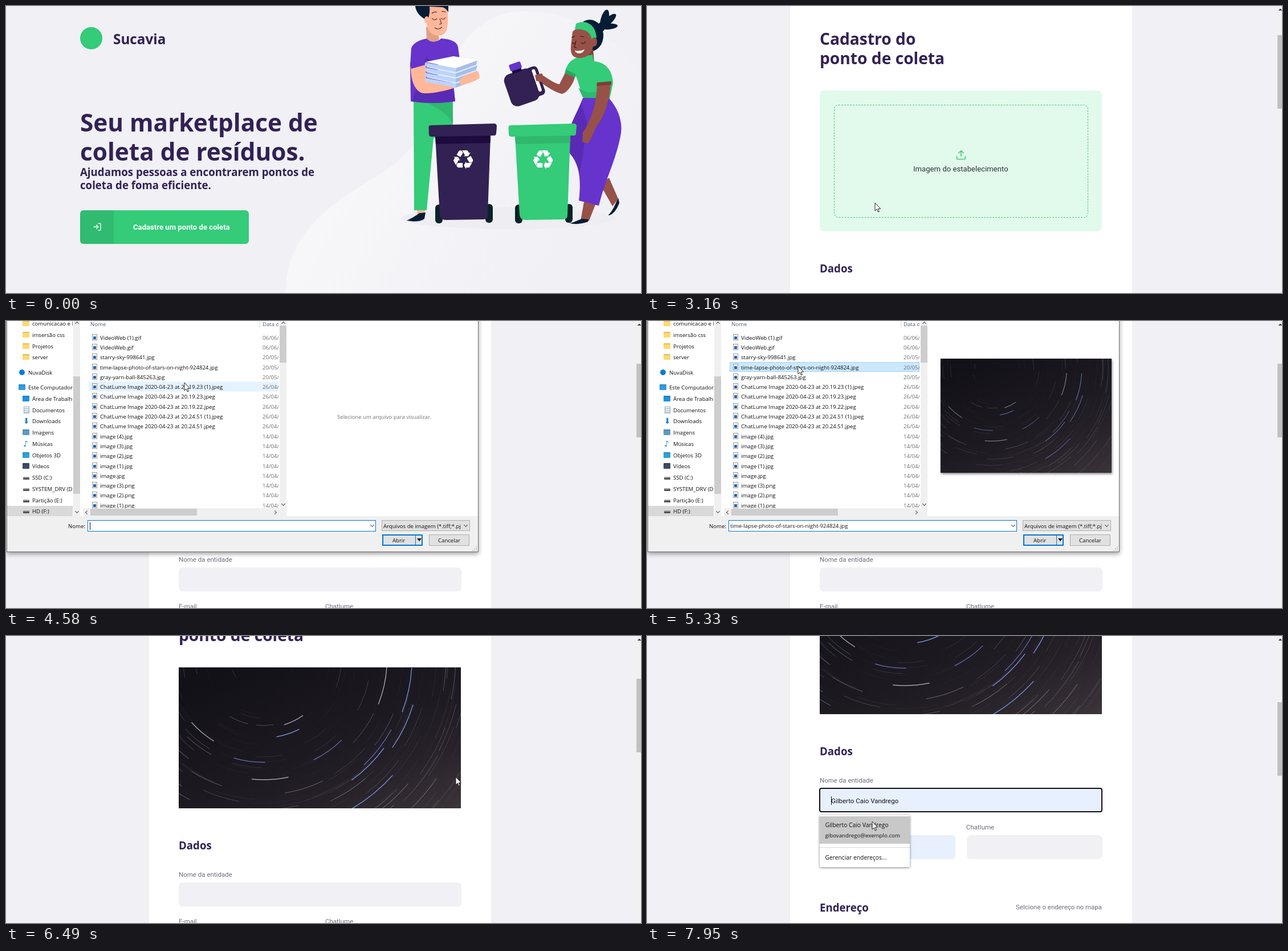
Animation of 1114 by 503 pixels, one loop 8000 ms. Source, as an HTML page:

```html
<!DOCTYPE html>
<html lang="pt-BR">
<head>
<meta charset="utf-8">
<title>Ponto de coleta</title>
<style>
html, body { margin: 0; width: 100%; height: 100%; overflow: hidden; background: #f0f0f5; }
#stage { position: relative; width: 1114px; height: 503px; overflow: hidden; background: #f0f0f5; color: #322153; }
#stage div, #stage svg { position: absolute; box-sizing: border-box; }
.full { left: 0; top: 0; width: 1114px; height: 503px; }
svg { overflow: visible; }

/* text centred on its --y */
.t { position: absolute; left: calc(var(--x) * 1px); top: calc(var(--y) * 1px); transform: translateY(-50%); white-space: pre; font: 11.5px Roboto, sans-serif; }
.head { font: 700 18.66px "Open Sans", sans-serif; }
.big { font-size: 42.3px; }
.mid { font-size: 28.2px; }
.brand { font: 700 24.3px "Open Sans", sans-serif; }
.label { color: #6c6c80; }
.body { font-size: 13.15px; }
.ui { font: 9.6px "Open Sans", sans-serif; color: #111; }
.mark { width: 39px; height: 39px; border-radius: 50%; background: #34cb79; }

/* home */
#button { left: 130px; top: 357.5px; width: 296px; height: 59px; border-radius: 6px; background: #34cb79; overflow: hidden; }
#button div { left: 0; top: 0; width: 59px; height: 59px; background: rgba(0,0,0,.08); }
#status { left: -1px; top: 496px; width: 127px; height: 12px; background: #dfe1e6; border: 1px solid #c9cbd1; border-radius: 0 4px 0 0; overflow: hidden; }

/* form */
#card { left: 250.5px; top: -106px; width: 600px; height: 1500px; border-radius: 7px; background: #fff; }
.drop { left: 303px; top: 55px; width: 495px; height: 247px; }
#zone { border-radius: 8px; background: #e1faec; }
#zone div { left: 25px; top: 25px; width: 446px; height: 198px; border: 1px dashed #4ecb79; border-radius: 8px; }
.photo { background: linear-gradient(155deg, #131118 10%, #1d1a22 55%, #272129 75%, #3b353a); overflow: hidden; }
.photo svg { width: 100%; height: 100%; overflow: hidden; }
.field { left: 303px; width: 495.5px; height: 42px; border-radius: 6.6px; background: #f0f0f5; }
#focus { left: 302px; top: 431px; width: 497px; height: 43px; border: 2px solid #101010; border-radius: 4px; }
.caret { width: 1px; background: #111; }
#menu { left: 302.5px; top: 479px; width: 158px; height: 91px; background: #fff; box-shadow: 0 1px 4px rgba(0,0,0,.5); border-radius: 2px; }
#menu > div { left: 0; width: 158px; }
#bar { left: 1106px; top: 0; width: 8px; height: 503px; background: #f1f1f1; }
#thumb { left: 0; top: 0; width: 8px; height: 129px; background: #c1c1c1; }

/* file dialog */
#dialog { left: 1px; top: -10px; width: 828px; height: 415px; background: #fff; border: 1px solid #70707a; box-shadow: 0 3px 8px rgba(0,0,0,.4); transform-origin: 50% 50%; }
#inner { left: -2px; top: 9px; width: 828px; height: 405px; }
.clip { left: 0; top: 0; height: 342px; overflow: hidden; }
.row { left: 145px; top: 20px; width: 333px; height: 17.3px; }
.box { background: #e1e1e1; border: 1px solid #adadad; }
.track { background: #f0f0f0; }
.grab { background: #cdcdcd; }
.chev { width: 5px; height: 5px; border: solid #505050; border-width: 1.3px 0 0 1.3px; transform: rotate(45deg); }
.file { width: 9px; height: 11px; border: 1px solid #9a9a9a; background: linear-gradient(#2f7dc8, #1c4f93) 1px 3px / 5px 5px no-repeat #fff; }

/* motion */
.loop { animation: 8s step-end infinite; }
#home { animation-name: home; }
#form { animation-name: form; }
#button { animation-name: press; }
#status { animation-name: status; }
#doc { animation-name: scroll; }
#thumb { animation-name: thumb; }
#dialog { animation-name: dialog; }
#hover { animation-name: hover; }
.picked { animation-name: picked; }
.unpicked { animation-name: unpicked; }
#preview { animation-name: preview; }
#hint { animation-name: hint; }
#pic { animation-name: pic; }
#focus, #menu { animation-name: menu; }
.fill { animation-name: fill; }
#cursor { animation-name: cursor; }
#hand { animation-name: hand; }
#arrow { animation-name: arrow; }
#click { animation-name: click; }

@keyframes home { 0% { opacity: 1 } 29.95%, to { opacity: 0 } }
@keyframes form { 0% { opacity: 0 } 29.95%, to { opacity: 1 } }
@keyframes press { 0% { background: #34cb79 } 24.9%, to { background: #2fb86e } }
@keyframes status { 0% { opacity: 0 } 27.9% { opacity: 1 } 30.9%, to { opacity: 0 } }
@keyframes scroll {
  0%, 33.6% { transform: translateY(240px); animation-timing-function: steps(6) }
  39.4% { transform: translateY(93px); animation-timing-function: steps(4) }
  43.25%, 83% { transform: none; animation-timing-function: steps(8) }
  91%, to { transform: translateY(-165px) }
}
@keyframes thumb {
  0%, 33.6% { transform: translateY(14px); animation-timing-function: steps(6) }
  39.4% { transform: translateY(51px); animation-timing-function: steps(4) }
  43.25%, 83% { transform: translateY(75px); animation-timing-function: steps(8) }
  91%, to { transform: translateY(116px) }
}
@keyframes dialog {
  0%, 51.3% { opacity: 0; transform: scale(.96); animation-timing-function: steps(3, start) }
  54.2%, 69.4% { opacity: 1; transform: none; animation-timing-function: steps(2, start) }
  71.2%, to { opacity: 0; transform: scale(.96) }
}
@keyframes hover {
  0% { opacity: 0; transform: none }
  55% { opacity: 1; transform: translateY(190.3px) }
  56.1% { opacity: 1; transform: translateY(138.4px) }
  57.1% { opacity: 1; transform: translateY(86.5px) }
  58.1% { opacity: 1; transform: translateY(69.2px) }
  61.9% { opacity: 1; transform: translateY(51.9px) }
  64.6%, to { opacity: 0; transform: none }
}
@keyframes picked { 0% { opacity: 0 } 64.6%, to { opacity: 1 } }
@keyframes unpicked { 0% { opacity: 1 } 64.6%, to { opacity: 0 } }
@keyframes preview { 0% { opacity: 0 } 65.6%, to { opacity: 1 } }
@keyframes hint { 0% { opacity: 1 } 65.6%, to { opacity: 0 } }
@keyframes pic { 0% { opacity: 0 } 80.1%, to { opacity: 1 } }
@keyframes menu { 0% { opacity: 0 } 93.5%, to { opacity: 1 } }
@keyframes fill { 0% { opacity: 0 } 98%, to { opacity: 1 } }
@keyframes cursor {
  0% { opacity: 0; transform: translate(975px, 480px) }
  17.2% { opacity: 1; transform: translate(975px, 480px); animation-timing-function: steps(9) }
  25.8%, 33.6% { opacity: 1; transform: translate(379px, 380px); animation-timing-function: steps(6) }
  39.4% { opacity: 1; transform: translate(400px, 345px); animation-timing-function: steps(4) }
  43.25%, 44.3% { opacity: 1; transform: translate(459px, 206px); animation-timing-function: steps(4) }
  48.5%, 55% { opacity: 1; transform: translate(461px, 214px); animation-timing-function: steps(2) }
  57.1% { opacity: 1; transform: translate(313px, 108px); animation-timing-function: steps(7) }
  63.75%, 68.4% { opacity: 1; transform: translate(265px, 79px); animation-timing-function: steps(3) }
  71.25%, 74.25% { opacity: 1; transform: translate(395px, 98px); animation-timing-function: steps(4) }
  77.1% { opacity: 1; transform: translate(779px, 247px) }
  80.1%, 83% { opacity: 1; transform: translate(789px, 247px); animation-timing-function: steps(10) }
  92.5%, 95.5% { opacity: 1; transform: translate(395px, 290px); animation-timing-function: steps(3) }
  99.1%, to { opacity: 1; transform: translate(395px, 325px) }
}
@keyframes hand { 0% { opacity: 0 } 24.9% { opacity: 1 } 33.6% { opacity: 0 } 42.2% { opacity: 1 } 55% { opacity: 0 } 70.2% { opacity: 1 } 80.1%, to { opacity: 0 } }
@keyframes arrow { 0% { opacity: 1 } 24.9% { opacity: 0 } 33.6% { opacity: 1 } 42.2% { opacity: 0 } 55% { opacity: 1 } 70.2% { opacity: 0 } 80.1%, to { opacity: 1 } }
@keyframes click { 0% { opacity: 0 } 28.9% { opacity: 1 } 30.9% { opacity: 0 } 45.4% { opacity: 1 } 48.4% { opacity: 0 } 64.6% { opacity: 1 } 65.6% { opacity: 0 } 92.5% { opacity: 1 } 93.5%, to { opacity: 0 } }
</style>
</head>
<body>
<div id="stage">

<div id="home" class="full loop">
  <svg class="full" viewBox="0 0 1114 503">
    <defs>
      <linearGradient id="blob" x1="0" y1="0" x2="1" y2=".5">
        <stop offset=".2" stop-color="#f9f9fb"/><stop offset="1" stop-color="#f0f0f5"/>
      </linearGradient>
      <g id="bin">
        <rect x="753" y="348" width="13" height="33" rx="6" fill="#0a2329"/>
        <rect x="841" y="347" width="13" height="33" rx="6" fill="#0a2329"/>
        <path d="M753 227H850L845 366Q845 374 837 374L772 375Q762 375 761 366Z"/>
        <path d="M753 228L850 227 849.500 240 754 242Z" fill="var(--band)"/>
        <path d="M746 209L856 206Q861 206 861 211L860 223Q860 227 856 227L747 229Q742 229 742 225L741.500 213Q741.500 209 746 209Z"/>
        <text x="802" y="286" font-size="47" text-anchor="middle" fill="#fff" font-family="DejaVu Sans, sans-serif">&#9851;&#65038;</text>
      </g>
    </defs>
    <path d="M490 503C492 405 560 352 636 307C715 262 738 218 757 160C785 70 830 12 905 9C985 8 1065 45 1114 115V503Z" fill="url(#blob)"/>
    <ellipse cx="882" cy="372" rx="188" ry="19" fill="#ededf2"/>

    <!-- man -->
    <path d="M715 166H784V212L750 232 738 358H716Z" fill="#34cb79"/>
    <path d="M738 168H783L784 207C776 188 756 180 738 168Z" fill="#2fb86e"/>
    <path d="M721 358H735L734 368 722 370Z" fill="#ffb799"/>
    <path d="M703 376C712 372 720 367 725 363L736 362 734 373C726 379 714 378 703 376Z" fill="#061c35"/>
    <path d="M737 36L738 60C744 67 757 65 760 58L757 44Z" fill="#e0a086"/>
    <path d="M711 74C714 64 728 59 738 57C744 65 757 64 763 57C780 58 791 62 793 72L796 94 784 128 788 167C762 171 734 171 710 167L709 104Z" fill="#6633cc"/>
    <path d="M737 90L790 120 784 134 788 167C760 171 735 171 712 167L718 150Z" fill="#592bb4"/>
    <path d="M732 0H772C776 12 776 26 774 38C772 48 767 52 758 52C745 51 739 42 738 30Z" fill="#ffb799"/>
    <path d="M718 0H776V11C773 6 769 2 764 2L743 1C744 10 742 18 740 25C730 22 719 12 718 0Z" fill="#061c35"/>
    <ellipse cx="738" cy="24" rx="4" ry="6" fill="#ffb799"/>
    <path d="M747 21Q751 27 756 22M763 21Q767 26 771 20M747 13Q751 9 756 11M764 10Q768 8 771 11M761 22L764 31 760 32M752 38Q758 43 765 37" fill="none" stroke="#4b2a35" stroke-width="1.1"/>
    <path d="M710 106L736 99 737 130C752 139 780 137 797 130L800 139C780 147 750 154 733 153C717 151 710 130 710 106Z" fill="#ffb799"/>
    <path d="M709 100L735 94 736 103 711 110Z" fill="#6633cc"/>
    <g id="papers"></g>
    <path d="M795 131C802 122 814 116 829 115L831 126C822 133 806 137 797 139Z" fill="#ffb799"/>

    <!-- woman -->
    <g fill="#061c35">
      <ellipse cx="1024" cy="52" rx="24" ry="28"/>
      <ellipse cx="1050" cy="25" rx="7" ry="19" transform="rotate(14 1050 25)"/>
      <ellipse cx="1057" cy="26" rx="6" ry="17" transform="rotate(48 1057 26)"/>
      <ellipse cx="1058" cy="36" rx="5" ry="15" transform="rotate(84 1058 36)"/>
      <ellipse cx="1044" cy="37" rx="7" ry="8"/>
      <path d="M1057 366C1064 360 1069 347 1074 336L1076 345C1072 356 1065 366 1057 367Z"/>
    </g>
    <path d="M1042 312L1058 301 1074 338 1064 351Z" fill="#975148"/>
    <path d="M1014 343L1034 348 1023 376 1008 377Z" fill="#975148"/>
    <path d="M989 381C998 379 1005 374 1011 373L1022 374 1021 378C1010 382 999 383 989 381Z" fill="#061c35"/>
    <path d="M1010 84L1030 76 1032 101 1013 101Z" fill="#7b3e37"/>
    <path d="M981 117L998 124C996 136 984 153 975 154C963 151 949 142 940 135L929 130 928 119 944 123C956 131 966 137 971 137Z" fill="#975148"/>
    <path d="M980 118C983 102 992 92 1005 90L1029 85 1031 97C1052 98 1064 113 1065 135L1059 163C1042 166 1025 165 1012 160L1001 125Z" fill="#34cb79"/>
    <path d="M1004 143C1015 153 1030 153 1040 148L1040 165C1028 165 1018 163 1012 160Z" fill="#2fb86e"/>
    <path d="M983 112L999 119 998 125 981 118Z" fill="#2aa463"/>
    <path d="M994 45C1002 36 1018 38 1027 52L1031 66C1029 82 1021 91 1006 91C993 91 990 83 991 70Z" fill="#975148"/>
    <path d="M1000 31C1016 23 1034 31 1036 55L1028 60C1026 46 1016 39 998 41Z" fill="#34cb79"/>
    <ellipse cx="1032" cy="63" rx="5" ry="8" fill="#975148"/>
    <path d="M998 78Q1007 80 1015 76Q1012 84 1004 83Q999 82 998 78Z" fill="#fff"/>
    <path d="M993 64Q997 68 1000 63M1009 64Q1013 68 1017 62M1000 61L997 72 1001 73M992 55L998 53M1007 53L1014 54" fill="none" stroke="#3d1719" stroke-width="1.2"/>
    <path d="M1012 161L1058 162C1075 181 1083 205 1078 228C1070 270 1050 308 1040 350L1005 341C1009 305 1007 280 989 258V215C996 195 1005 180 1012 161Z" fill="#6633cc"/>
    <path d="M1009 169C1003 185 995 197 989 215V258C998 268 1004 279 1006 292C1013 268 1014 238 1019 205Z" fill="#592bb4"/>
    <path d="M1037 137L1061 134C1060 162 1051 188 1041 204C1032 214 1031 227 1021 241L1011 238 1012 222C1024 205 1036 175 1037 137Z" fill="#975148"/>
    <path d="M1037 134L1062 132V138L1036 140Z" fill="#7b3e37"/>
    <g transform="rotate(-19 908 140)" fill="#322153">
      <rect x="920" y="113" width="21" height="53" rx="7"/>
      <rect x="930" y="118" width="6" height="41" rx="3" fill="#fff"/>
      <rect x="878" y="112" width="52" height="59" rx="12"/>
      <rect x="897" y="106" width="17" height="8" fill="#1c0b3c"/>
      <rect x="895" y="97" width="21" height="12" rx="2.500" fill="#6633cc"/>
    </g>
    <path d="M928 121L940 118 944 125 941 134 930 131Z" fill="#975148"/>

    <use href="#bin" fill="#322153" style="--band:#1c0b3c"/>
    <use href="#bin" x="140" fill="#34cb79" style="--band:#2fb86e"/>
  </svg>
  <div class="mark" style="left:130px;top:37px"></div>
  <span class="t brand" style="--x:188;--y:57">Sucavia</span>
  <span class="t head big" style="--x:130;--y:203">Seu marketplace de</span>
  <span class="t head big" style="--x:130;--y:254">coleta de resíduos.</span>
  <span class="t head" style="--x:130;--y:289.500">Ajudamos pessoas a encontrarem pontos de</span>
  <span class="t head" style="--x:130;--y:312.500">coleta de foma eficiente.</span>
  <div id="button" class="loop">
    <div></div>
    <svg style="left:22px;top:21.500px" width="16" height="16" viewBox="0 0 24 24" fill="none" stroke="#fff" stroke-width="2" stroke-linecap="round" stroke-linejoin="round"><path d="M15 3h4a2 2 0 0 1 2 2v14a2 2 0 0 1-2 2h-4M10 17l5-5-5-5M15 12H3"/></svg>
    <span class="t body" style="--x:93;--y:29.500;font-weight:700;color:#fff">Cadastre um ponto de coleta</span>
  </div>
  <div id="status" class="loop"><span class="t ui" style="--x:-4;--y:8;color:#555">localhost:3000/create-point</span></div>
</div>

<div id="form" class="full loop" style="background:#f0f0f5">
  <div id="doc" class="full loop">
    <div class="mark" style="left:101px;top:-203px"></div>
    <span class="t brand" style="--x:159;--y:-183">Sucavia</span>
    <div id="card"></div>
    <span class="t head mid" style="--x:303;--y:-36">Cadastro do</span>
    <span class="t head mid" style="--x:303;--y:-2">ponto de coleta</span>
    <div id="zone" class="drop">
      <div></div>
      <svg style="left:238px;top:103px" width="20" height="20" viewBox="0 0 24 24" fill="none" stroke="#4ecb79" stroke-width="2" stroke-linecap="round" stroke-linejoin="round"><path d="M21 15v4a2 2 0 0 1-2 2H5a2 2 0 0 1-2-2v-4M17 8l-5-5-5 5M12 3v12"/></svg>
      <span class="t body" style="--x:164;--y:137;color:#333">Imagem do estabelecimento</span>
    </div>
    <div id="pic" class="drop photo loop"><svg viewBox="0 0 300 200" preserveAspectRatio="xMidYMid slice"><g id="sky" fill="none"></g></svg></div>
    <span class="t head" style="--x:303;--y:366">Dados</span>
    <span class="t label" style="--x:303;--y:417.500">Nome da entidade</span>
    <div class="field" style="top:431.500px"></div>
    <div class="field fill loop" style="top:431.500px;background:#e8f0fe"></div>
    <div id="focus" class="loop"><div class="caret" style="left:19px;top:13px;height:15px"></div></div>
    <span class="t fill loop" style="--x:323;--y:453.500;color:#111">Gilberto Caio Vandrego</span>
    <span class="t label" style="--x:303;--y:499.500">E-mail</span>
    <span class="t label" style="--x:560;--y:499.500">Chatlume</span>
    <div class="field" style="top:514px;width:238px"></div>
    <div class="field fill loop" style="top:514px;width:238px;background:#e8f0fe"></div>
    <div class="field" style="left:560.500px;top:514px;width:238px"></div>
    <span class="t head" style="--x:303;--y:640">Endereço</span>
    <span class="t label" style="left:auto;right:316px;--y:640">Selcione o endereço no mapa</span>
    <div id="menu" class="loop">
      <div class="fill loop" style="top:2px;height:48px;background:#c8c8c8"></div>
      <div style="top:56px;height:1px;background:#d8d8d8"></div>
      <span class="t ui" style="--x:10;--y:17;font-size:10.300px;font-weight:500">Gilberto Caio Vandrego</span>
      <span class="t ui" style="--x:10;--y:35;font-size:9.700px">gibovandrego@exemplo.com</span>
      <span class="t ui" style="--x:10;--y:74;font-size:10.300px">Gerenciar endereços...</span>
    </div>
  </div>
  <div id="bar">
    <div id="thumb" class="loop"></div>
    <svg width="8" height="14"><path d="M1.500 8L5 4.500 8.500 8Z" fill="#404040"/></svg>
  </div>
  <div id="dialog" class="loop"><div id="inner">
    <div class="clip" id="nav" style="width:117px"></div>
    <div class="track" style="left:118px;top:0;width:12px;height:342px"></div>
    <div class="grab" style="left:118px;top:97px;width:12px;height:206px"></div>
    <div class="clip" id="list" style="width:478px;height:328px">
      <div id="hover" class="row loop" style="background:#e5f3ff"></div>
      <div class="row picked loop" style="top:71.900px;background:#cce8ff;border:1px solid #99d1ff"></div>
      <div style="left:445px;top:0;width:1px;height:12px;background:#ddd"></div>
    </div>
    <div class="track" style="left:480px;top:0;width:12px;height:328px"></div>
    <div class="grab" style="left:480px;top:8px;width:12px;height:65px"></div>
    <div class="track" style="left:135px;top:328px;width:357px;height:14px"></div>
    <div class="grab" style="left:148px;top:328.500px;width:187px;height:12px"></div>
    <span id="hint" class="t ui loop" style="--x:581;--y:168;color:#6d6d6d">Selecione um arquivo para visualizar.</span>
    <div id="preview" class="photo loop" style="left:515px;top:66px;width:300px;height:200px;overflow:visible;box-shadow:1px 2px 4px rgba(0,0,0,.5)"><svg viewBox="0 0 300 200"><use href="#sky"/></svg></div>
    <div style="left:2px;top:342px;width:826px;height:62px;background:#f0f0f0"></div>
    <span class="t ui" style="--x:109;--y:359">Nome:</span>
    <div style="left:143px;top:349px;width:506px;height:20px;background:#fff;border:1px solid #0078d7"></div>
    <div class="caret unpicked loop" style="left:147px;top:353px;height:13px"></div>
    <span class="t ui picked loop" style="--x:146;--y:359">time-lapse-photo-of-stars-on-night-924824.jpg</span>
    <div class="box" style="left:659px;top:349px;width:155px;height:19px"></div>
    <div style="left:659px;top:349px;width:139px;height:19px;overflow:hidden"><span class="t ui" style="--x:3;--y:10">Arquivos de imagem (*.tiff;*.pjp;*.jpg</span></div>
    <div class="box" style="left:660px;top:374px;width:71px;height:20px;border:2px solid #0078d7"></div>
    <div style="left:718px;top:376px;width:1px;height:16px;background:#0078d7"></div>
    <svg style="left:721px;top:381px" width="9" height="6"><path d="M0 0H8L4 5Z" fill="#111"/></svg>
    <span class="t ui" style="--x:678;--y:384">Abrir</span>
    <div class="box" style="left:742px;top:374px;width:71px;height:20px"></div>
    <span class="t ui" style="--x:758;--y:384">Cancelar</span>
    <svg style="left:818px;top:395px" width="8" height="8"><path d="M7 0V8M4 3V8M1 6V8" stroke="#b0b0b0" stroke-width="1.500" stroke-dasharray="1.500 1.500"/></svg>
  </div></div>
</div>

<svg class="full" viewBox="0 0 1114 503">
  <g id="cursor" class="loop">
    <circle id="click" class="loop" r="10" fill="#ff0" fill-opacity=".5"/>
    <path id="arrow" class="loop" d="M0 0V14L3.200 11 5.400 16 7.400 15.100 5.300 10.200H9.600Z" fill="#fff" stroke="#111" stroke-width=".9"/>
    <path id="hand" class="loop" d="M-2 2C-2 0 1 0 1 2V8C2 7 4 7 4 9C5 8 7 8 7 10C8 9 10 10 10 12V15C10 18 9 18 8 20H0C-1 18 -3 15 -5 12C-6 10 -4 9 -2 12ZM1 8V12M4 9V13M7 10V13" fill="#fff" stroke="#111" stroke-width=".9"/>
  </g>
</svg>
</div>

<script>
const $ = id => document.getElementById(id);

function text(parent, str, x, y, color = '#111') {
  const el = document.createElement('span');
  el.className = 't ui';
  el.textContent = str;
  el.style.cssText = `--x:${x};--y:${y};color:${color}`;
  parent.append(el);
  return el;
}
function box(parent, x, y, w, h, css = '', cls = '') {
  const el = document.createElement('div');
  el.className = cls;
  el.style.cssText = `left:${x}px;top:${y}px;${w ? `width:${w}px;height:${h}px;` : ''}${css}`;
  parent.append(el);
}
function path(parent, attrs) {
  const el = document.createElementNS('http://www.w3.org/2000/svg', 'path');
  for (const k in attrs) el.setAttribute(k, attrs[k]);
  parent.append(el);
}

// stack of folded paper, bottom sheet first
for (let i = 3; i >= 0; i--) {
  const y = i * 9;
  path($('papers'), { d: `M736 ${99 + y}L789 ${109 + y}V${116 + y}L737 ${106 + y}Q733 ${102 + y} 736 ${99 + y}Z`, fill: '#bcd4fa' });
  path($('papers'), { d: `M789 ${109 + y}L827 ${95 + y}L825 ${103 + y}L789 ${116 + y}Z`, fill: '#a5bfe9' });
  path($('papers'), { d: `M736 ${98 + y}L785 ${88 + y}L828 ${95 + y}L789 ${109 + y}Z`, fill: i ? '#e3edfe' : '#fff' });
}

// star trails around the pole
const pole = [90, 16];
function trail(r, from, sweep, stroke, width) {
  const at = deg => {
    const a = deg * Math.PI / 180;
    return (pole[0] + r * Math.cos(a)).toFixed(2) + ' ' + (pole[1] + r * Math.sin(a)).toFixed(2);
  };
  path($('sky'), { d: `M${at(from)}A${r} ${r} 0 0 1 ${at(from + sweep)}`, stroke, 'stroke-width': width });
}
let seed = 11;
const rnd = () => (seed = seed * 16807 % 2147483647) / 2147483647;
for (let i = 0; i < 330; i++) {
  const r = 5 + 255 * Math.sqrt(rnd());
  const light = rnd() ** 3;
  trail(r, rnd() * 225 - 30, 14 + 4 * rnd(), `rgba(165,165,175,${(.07 + .4 * light).toFixed(2)})`, .45 + .2 * light);
}
const blue = '#7f9be6', dim = '#6670b4', pale = '#b5b8c4';
[[158, 3.5, blue], [131.5, 4, pale], [166.5, 17, blue], [155.5, 29, dim], [159.5, 36.5, blue], [185, 42, blue],
 [110, 89, dim], [84, 63, blue], [73.5, 55, pale], [128.5, 78, pale], [102, 121, pale], [120, 46, dim]]
  .forEach(([r, from, color]) => trail(r, from, 17.5, color, .75));

// folder tree: label, y, indent, icon colour, icon shape
const nav = $('nav');
box(nav, 2, 323.5, 115, 19, 'background:#d9d9d9');
[['comunicacao e Imagem', 4, 46, '#ffd970'], ['imsersão css', 24, 46, '#ffd970'], ['Projetos', 43.5, 46, '#ffd970'], ['server', 63, 46, '#ffd970'],
 ['NuvaDisk', 90, 39, '#0f7ad6', 'dot'], ['Este Computador', 116, 39, '#2f9be0'], ['Área de Trabalho', 136, 46, '#1e90dd'],
 ['Documentos', 155.5, 46, '#8aa3b8', 'page'], ['Downloads', 175, 46, '#1f83d6', '⬇'], ['Imagens', 195, 46, '#5c9cc4'],
 ['Músicas', 214.5, 46, '#1f83d6', '♪'], ['Objetos 3D', 234.5, 46, '#29a3d8'], ['Vídeos', 254, 46, '#3c4a66'],
 ['SSD (C:)', 274, 46, '#555', 'disk'], ['SYSTEM_DRV (D:)', 293.5, 46, '#555', 'disk'], ['Partição (E:)', 313.5, 46, '#555', 'disk'], ['HD (F:)', 333, 46, '#555', 'disk']
].forEach(([label, y, x, color, shape]) => {
  const left = x - 17;
  if (shape === 'dot') box(nav, left + 1, y - 5, 10, 10, `background:${color};border-radius:50%`);
  else if (shape === 'page') box(nav, left + 2, y - 6, 10, 12, `background:repeating-linear-gradient(#fff 0 2px,${color} 2px 3px);border:1px solid ${color}`);
  else if (shape === 'disk') box(nav, left + 1, y - 1, 11, 5, `background:${color};border-top:2px solid #a0a0a0;border-radius:1px`);
  else if (shape) Object.assign(text(nav, shape, left + 1, y, color).style, { fontFamily: 'DejaVu Sans, sans-serif', fontSize: '14px' });
  else box(nav, left, y - 5, 12, 10, `background:${color};border-radius:1px;border-top:2px solid rgba(0,0,0,.12)`);
  text(nav, label, x, y);
});

// file list
const list = $('list');
text(list, 'Nome', 148, 5, '#4c607a');
text(list, 'Data de modificação', 450, 5, '#4c607a');
const chat = 'ChatLume Image 2020-04-23 at 20.';
const files = ['VideoWeb (1).gif', 'VideoWeb.gif', 'starry-sky-998641.jpg', 'time-lapse-photo-of-stars-on-night-924824.jpg', 'gray-yarn-ball-845263.jpg',
  ...['19.23 (1)', '19.23', '19.22', '24.51 (1)', '24.51'].map(s => chat + s + '.jpeg'),
  ...[' (4).jpg', ' (3).jpg', ' (2).jpg', ' (1).jpg', '.jpg', ' (3).png', ' (2).png', ' (1).png'].map(s => 'image' + s)];
files.forEach((name, i) => {
  const y = 28.6 + 17.3 * i;
  box(list, 151, y - 6, 0, 0, '', 'file');
  text(list, name, 165, y);
  text(list, (i < 2 ? '06/06' : i < 5 ? '20/05' : i < 10 ? '26/04' : '14/04') + '/2020', 450, y, '#6d6d6d');
});

// scroll and drop-down chevrons: x, y, angle
[[124, 4, 45], [124, 333, 225], [486, 4, 45], [486, 320, 225], [142, 335, -45], [471, 335, 135], [642, 357.5, 225], [806, 357.5, 225]]
  .forEach(([x, y, a]) => box($('inner'), x - 2.5, y - 2.5, 0, 0, `transform:rotate(${a}deg)`, 'chev'));
</script>
</body>
</html>
```
